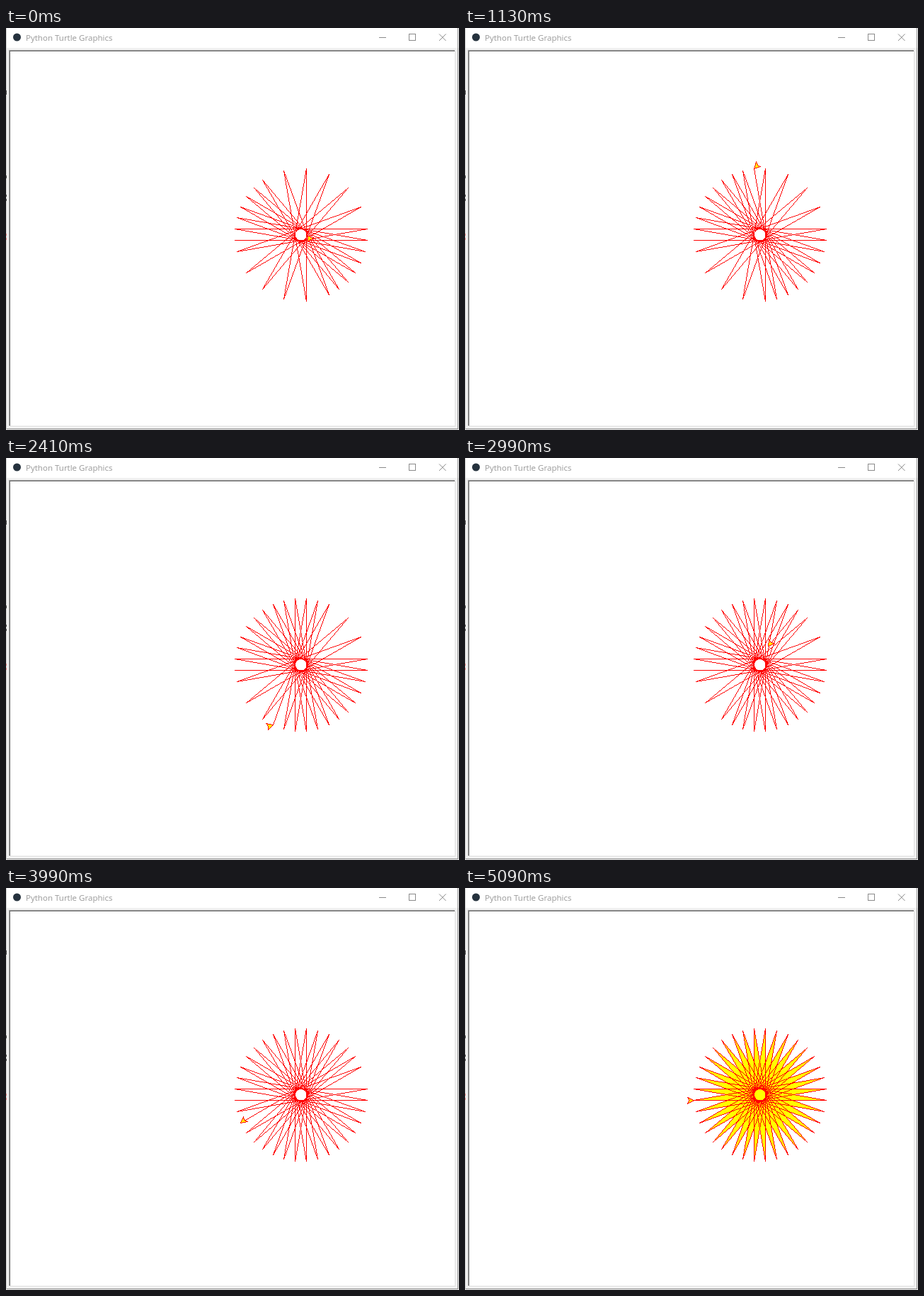
An HTML page with a canvas that plays this animation: 640x567 px, repeating every 6.24 s.

```html
<!DOCTYPE html>
<html lang="en">
<head>
<meta charset="utf-8">
<title>Python Turtle Graphics</title>
<style>
  html, body { margin: 0; width: 100%; height: 100%; overflow: hidden; background: #fff; }
  svg, canvas { position: absolute; left: 0; top: 0; width: 640px; height: 567px; }
  text { font: 11.55px "Open Sans", "Noto Sans", sans-serif; fill: #999; }
</style>
</head>
<body>
<svg viewBox="0 0 640 567" shape-rendering="crispEdges">
  <!-- window -->
  <rect width="640" height="567" fill="#fff"/>
  <rect y="28" width="640" height="539" fill="#f0f0f0"/>
  <rect x="4" y="31" width="631" height="531" fill="#fff"/>
  <path d="M4 31.5H634M4.5 31V561" stroke="#a0a0a0"/>
  <path d="M5 32.5H634M5.5 32V561" stroke="#696969"/>
  <path d="M5 561.5H635M634.5 32V562" stroke="#e3e3e3"/>
  <path d="M638.5 0V566M0 565.5H639" stroke="#8c8c8c"/>
  <path d="M.5 0V566" stroke="#d0d0d0"/>
  <path d="M.5 88v6M.5 208v4M.5 235v3M.5 241v3" stroke="#444"/>
  <path d="M.5 290v3M.5 296v3" stroke="#e08080"/>
  <!-- title bar -->
  <circle cx="15.5" cy="13" r="5.5" fill="#26323e" shape-rendering="auto"/>
  <text x="28" y="18">Python Turtle Graphics</text>
  <g fill="none" stroke="#8a8a8a">
    <path d="M527 13.5H537"/>
    <rect x="569.5" y="8.5" width="9" height="9"/>
    <path d="M612 8.5L621.5 18M621.5 8.5L612 18" shape-rendering="auto"/>
  </g>
</svg>
<canvas id="stage" width="640" height="567"></canvas>
<script>
const LOOP = 6240;
const REFRESH = 141;          // ms between screen updates
const LAST_REFRESH = 36;
const STEPS_PER_REFRESH = 11.92;
const FIRST_SIDE = 24, FIRST_HOP = 8;

const SIDE = 187, TURN = 170, SIDES = 36;
const HOPS = 17, SPINS = 19, CYCLE = HOPS + SPINS;
const END = (SIDES - FIRST_SIDE) * CYCLE;

const rad = deg => deg * Math.PI / 180;
const CENTER = [416.2, 291.2];
const RADIUS = SIDE / 2 / Math.cos(rad(5));
const ARROW = [[0, 0], [-8.4, 4.7], [-6.5, 0], [-8.4, -4.7]];

const ctx = document.getElementById("stage").getContext("2d");

function corner(k) {
  const a = rad(185 + TURN * k);
  return [CENTER[0] + RADIUS * Math.cos(a), CENTER[1] - RADIUS * Math.sin(a)];
}

function pose(step) {
  const side = FIRST_SIDE + Math.floor(step / CYCLE);
  const part = step % CYCLE;
  const go = Math.min(part / HOPS, 1);
  const spin = Math.max(part - HOPS, 0) / SPINS;
  const from = corner(side), to = corner(side + 1);
  return {
    side,
    at: from.map((v, i) => v + (to[i] - v) * go),
    heading: rad(TURN * (side + spin))
  };
}

// One-pixel line without smoothing.
function pixelLine([x0, y0], [x1, y1]) {
  const n = Math.max(Math.abs(x1 - x0), Math.abs(y1 - y0));
  for (let i = 0; i <= n; i++) {
    const f = n ? i / n : 0;
    ctx.fillRect(Math.round(x0 + (x1 - x0) * f), Math.round(y0 + (y1 - y0) * f), 1, 1);
  }
}

function outline(points) {
  const grid = points.map(p => p.map(Math.round));
  ctx.fillStyle = "#f00";
  for (let i = 1; i < grid.length; i++) pixelLine(grid[i - 1], grid[i]);
}

function fill(points) {
  ctx.fillStyle = "#ff0";
  ctx.beginPath();
  for (const [x, y] of points) ctx.lineTo(Math.round(x) + 0.5, Math.round(y) + 0.5);
  ctx.fill();
}

function arrow({ at, heading }) {
  const c = Math.cos(heading), s = Math.sin(heading);
  const points = ARROW.map(([x, y]) => [at[0] + x * c + y * s, at[1] - x * s + y * c]);
  fill(points);
  outline([...points, points[0]]);
}

function draw(refresh) {
  const step = Math.min(Math.round(FIRST_HOP + STEPS_PER_REFRESH * refresh), END);
  const turtle = pose(step);
  const path = Array.from({ length: turtle.side + 1 }, (_, k) => corner(k));
  path.push(turtle.at);
  ctx.clearRect(0, 0, 640, 567);
  if (step === END) fill(path);
  outline(path);
  arrow(turtle);
}

const start = performance.now();
let shown = -1;
function tick() {
  const t = (performance.now() - start) % LOOP;
  const refresh = Math.min(Math.floor(t / REFRESH), LAST_REFRESH);
  if (refresh !== shown) draw(shown = refresh);
  requestAnimationFrame(tick);
}
tick();
</script>
</body>
</html>
```
